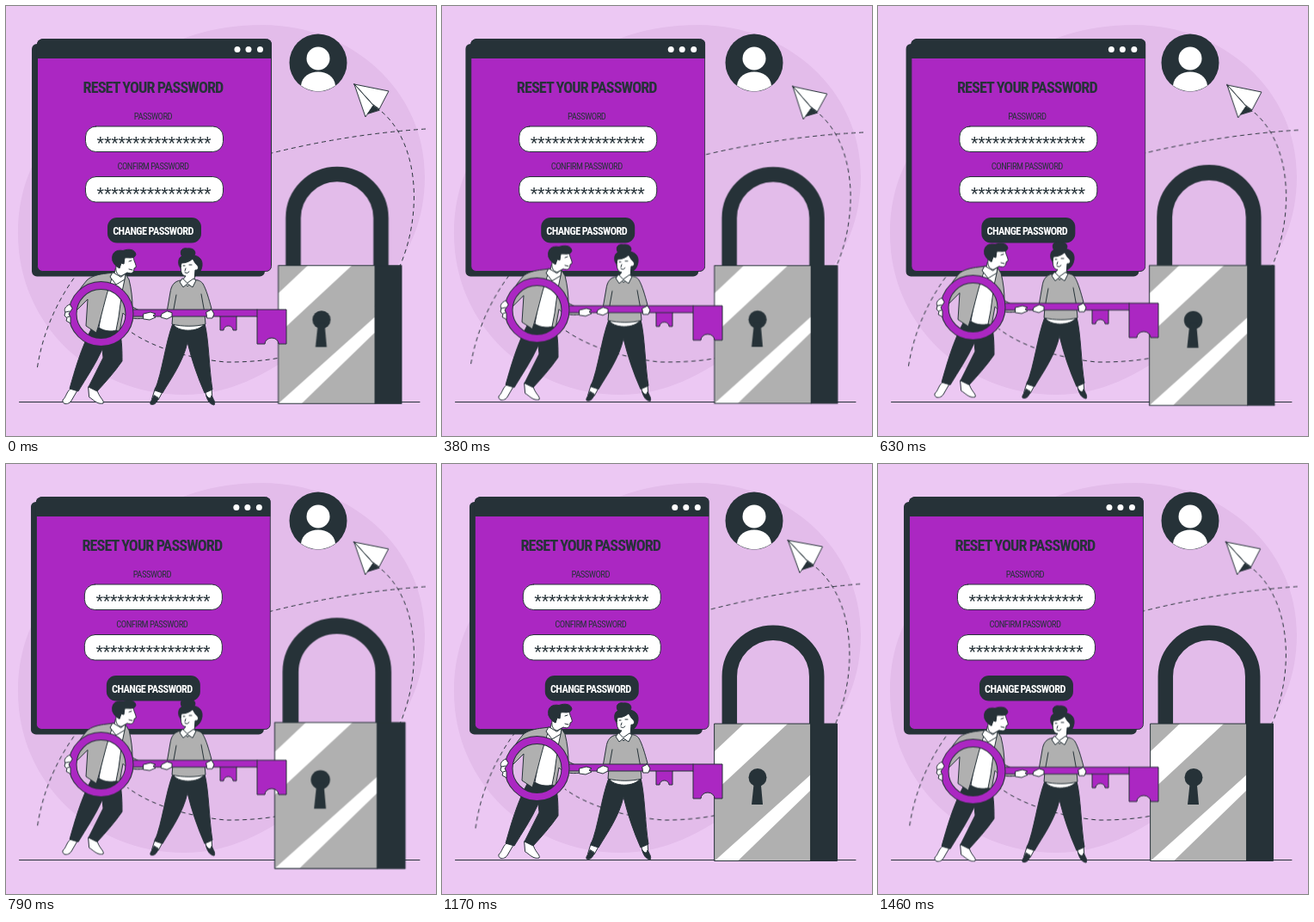
An HTML page without scripts for the animation above (1500 ms loop, 500 by 500 pixels).

```html
<!DOCTYPE html>
<html lang="en">
<head>
<meta charset="utf-8">
<title>Reset your password</title>
<style>
  :root { --ink: #263238; --accent: #ab27c2; --grey: #b0b0b0; }
  html, body { margin: 0; width: 100%; height: 100%; overflow: hidden; background: #ecc8f3; }
  svg { display: block; width: 100%; height: 100%; }

  .ink { fill: var(--ink); }
  .white { fill: #fff; }
  .accent { fill: var(--accent); }
  .grey { fill: var(--grey); }
  .line { fill: none; }
  .edge { stroke: var(--ink); stroke-width: 1; stroke-linejoin: round; stroke-linecap: round; }
  .dash { fill: none; stroke: var(--ink); stroke-width: 1; stroke-dasharray: 5 4; }

  text { fill: var(--ink); text-anchor: middle; }
  .label {
    font: 10.65px "Roboto Condensed", Roboto, "Open Sans", sans-serif;
    font-stretch: 75%; letter-spacing: -.05em;
  }
  .title { font-size: 18.1px; font-weight: 700; }
  .action { font-size: 12.35px; font-weight: 700; fill: #fff; }
  .stars { font: 22px "Liberation Sans", Arial, sans-serif; letter-spacing: -.26px; }

  .window, .flight, .lock, .carry { animation: 1.5s -1.493s infinite; }
  .window { animation-name: shake; }
  .flight { animation-name: sway; animation-timing-function: linear; transform-origin: 262px 258px; }
  .lock { animation-name: beat; transform-origin: 388px 324px; }
  .carry { animation-name: lift; animation-timing-function: linear; }

  @keyframes shake {
    10%, 90% { transform: translateX(-1px); }
    20%, 80% { transform: translateX(2px); }
    30%, 50%, 70% { transform: translateX(-4px); }
    40%, 60% { transform: translateX(4px); }
  }
  @keyframes sway {
    0%, 100% { transform: rotate(0deg); }
    25% { transform: rotate(1deg); }
    75% { transform: rotate(-1deg); }
  }
  @keyframes beat {
    0%, 100% { transform: scale(1.006); }
    10%, 50% { transform: scale(1.1); }
    30%, 40%, 60%, 98% { transform: scale(1); }
  }
  @keyframes lift {
    0%, 100% { transform: translateY(0); }
    50% { transform: translateY(-9px); }
  }
</style>
</head>
<body>
<svg viewBox="0 0 500 500">
  <path fill="#e3bcea" d="M298 22C402 22 487 98 487 198C487 300 415 350 350 395C300 430 260 452 207 452C100 452 14 370 14 265C14 150 100 110 150 70C190 38 240 22 298 22Z"/>
  <path class="edge line" d="M15.500 460.500H481"/>

  <g class="flight">
    <path class="dash" d="M488 143Q398 149 309 171C180 205 55 290 36 423"/>
    <path class="dash" d="M437 123C480 160 484 240 459 300C420 390 340 415 255 414C215 410 170 398 141 376"/>
    <g class="edge white">
      <path d="M405 91L445 99L434 120L426 114Z"/>
      <path d="M405 91L421 125L434 120L427 115Z"/>
      <path d="M405 91L418 129L427 116Z"/>
      <path class="ink" d="M421 125L427 116L434 121Z"/>
    </g>
  </g>

  <g class="window">
    <rect class="ink" x="30" y="44" width="271" height="270.500" rx="6"/>
    <rect class="accent edge" x="36.500" y="38.500" width="272" height="270" rx="6"/>
    <path class="ink" d="M36 61V44.500a6 6 0 0 1 6-6H303a6 6 0 0 1 6 6V61Z"/>
    <g class="white">
      <circle cx="269" cy="50.500" r="3.500"/>
      <circle cx="282" cy="50.500" r="3.500"/>
      <circle cx="295.500" cy="50.500" r="3.500"/>
    </g>
    <text class="label title" x="171" y="100.500">RESET YOUR PASSWORD</text>
    <text class="label" x="171" y="132">PASSWORD</text>
    <text class="label" x="171" y="190">CONFIRM PASSWORD</text>
    <g class="white edge">
      <rect x="92.500" y="140" width="160" height="29.500" rx="12"/>
      <rect x="92.500" y="198.500" width="160" height="29.500" rx="12"/>
    </g>
    <text class="stars" x="172" y="167">****************</text>
    <text class="stars" x="172" y="225.500">****************</text>
    <rect class="ink" x="118" y="246" width="109" height="29.500" rx="11"/>
    <text class="label action" x="171" y="265.500">CHANGE PASSWORD</text>
  </g>

  <circle class="ink" cx="363" cy="66" r="33.500"/>
  <circle class="white" cx="363" cy="61" r="13.500"/>
  <path class="white" d="M343 92.500C345 71 381 71 383 92.500A33.500 33.500 0 0 1 343 92.500Z"/>

  <g class="lock">
    <path class="line" stroke="var(--ink)" stroke-width="17.500" d="M334.300 303V247a50.700 50.700 0 0 1 101.400 0V303"/>
    <rect class="grey" x="317" y="302" width="112" height="159.500"/>
    <path class="white" d="M351 302H402L317 381V334ZM429 361V379L344 461.500H317Z"/>
    <rect class="line edge" x="317" y="302" width="112" height="159.500"/>
    <rect class="ink edge" x="429" y="302" width="30.500" height="159.500"/>
    <circle class="ink" cx="367" cy="364.500" r="10.500"/>
    <path class="ink" d="M363 368L360 396H373L370.500 368Z"/>
  </g>

  <g class="carry">
    <g class="edge">
      <!-- man -->
      <path class="white" d="M75 445C70 449 70 455 66 458C65 464 73 464 76 459L83 447Z"/>
      <path class="white" d="M96 443L106 446C107 454 115 459 113 462C106 464 101 457 97 455Z"/>
      <path class="ink" d="M100 374L132 376C135 391 135 402 135 413C126 426 116 437 106 448L96 443L113 409L112 399C104 417 93 433 84 448L74 445C80 424 87 398 100 374Z"/>
      <path class="white" d="M127 306C127 311 124 314 118 317L108 374C115 379 125 379 132 376L140 319L138 309Z"/>
      <path class="grey" d="M125 310L117 311C108 312 99 314 94 319C86 328 80 339 74 349L82 354L95 341L93 372L105 380C111 362 115 340 122 320Z"/>
      <path class="grey" d="M139 312L143 318C146 330 147 341 147 350L163 358L161 363C149 365 140 362 136 357L132 379L128 377C133 357 133 336 138 318Z"/>
      <path class="white" d="M124 310L121 315L128 324L138 318L139 311L134 315Z"/>
      <path class="white" d="M133 291L148 291C148 296 152 301 151 304L149 305C149 310 146 312 141 310L134 314C129 313 127 308 128 303Z"/>
      <path class="ink" d="M124 296C122 287 128 283 136 284.500C143 282 150 283 151 289C149 295 142 292 138 293L137 300L134 299L132 305C128 303 125 300 124 296Z"/>
      <path class="line" d="M143 297l3-1M143 306l4 1"/>

      <!-- woman -->
      <path class="white" d="M174 444L183 447L177 458L170 457ZM231 445L239 444L240 458L234 456Z"/>
      <path class="ink" d="M172 453C171 457 167 460 168 463C173 465 176 460 177 456ZM233 453C234 459 237 463 242 464C244 461 241 457 239 453C238 457 236 457 233 453Z"/>
      <path class="white" d="M194 366H231L230 384H196Z"/>
      <path class="ink" d="M194 369C198 380 225 380 231 369C236 389 236 421 240 446L231 450C223 432 216 412 211 391C206 414 192 433 182 450L173 447C182 425 185 393 194 369Z"/>
      <path class="grey" d="M203 319C195 320 192 326 191 333L187 356L194 358L193 370C205 373 221 373 232 370L231 357L239 352C236 341 233 330 229 323C226 319 223 319 219 318Z"/>
      <path class="line" d="M198 336L194 358M227 335L231 357"/>
      <path class="ink" d="M201 301C199 291 206 289 212 289.500C222 289 229 293 228 302C227 310 222 314 216 316L207 312Z"/>
      <path class="white" d="M204 299C209 299 214 297 217 294C219 297 220 300 222 301C225 304 223 308 220 307L219 319L211 326L205 319L209 314C204 314 202 307 204 299Z"/>
      <path class="white" d="M205 317L202 321L206 327L211 323L217 327L221 319L218 317L211 322Z"/>
      <path class="ink" d="M204 290C201 283 207 281 211 282C218 281 222 286 219 290Z"/>
      <path class="line" d="M206 302l2 0M213 301l3 0M209 305l-1 3M208 310q3 2 5-1"/>

      <!-- key -->
      <path class="accent" d="M146 353H326V393H317A8 7 0 0 0 301 393H292V361H268V377H264A5.500 5 0 0 0 253 377H249V361H146Z"/>
      <path class="line" d="M249 361H268M292 353V361"/>
    </g>
    <circle class="line" cx="110.500" cy="358" r="33" stroke="var(--ink)" stroke-width="10"/>
    <circle class="line" cx="110.500" cy="358" r="33" stroke="var(--accent)" stroke-width="8"/>

    <g class="edge white">
      <path d="M74 347C69 349 67 353 69 356L68 360L71 363L70 366L75 369L75 362L73 358L77 352Z"/>
      <path class="line" d="M69 356l5-1M71 362l3-1"/>
      <path d="M160 358L168 356L174 358L171 360L174 362L167 365L160 364Z"/>
      <path d="M187 355L181 358L180 362L187 364L193 361L193 357Z"/>
      <path d="M233 356L239 353L242 358L240 363L234 363Z"/>
    </g>
  </g>
</svg>
</body>
</html>
```
